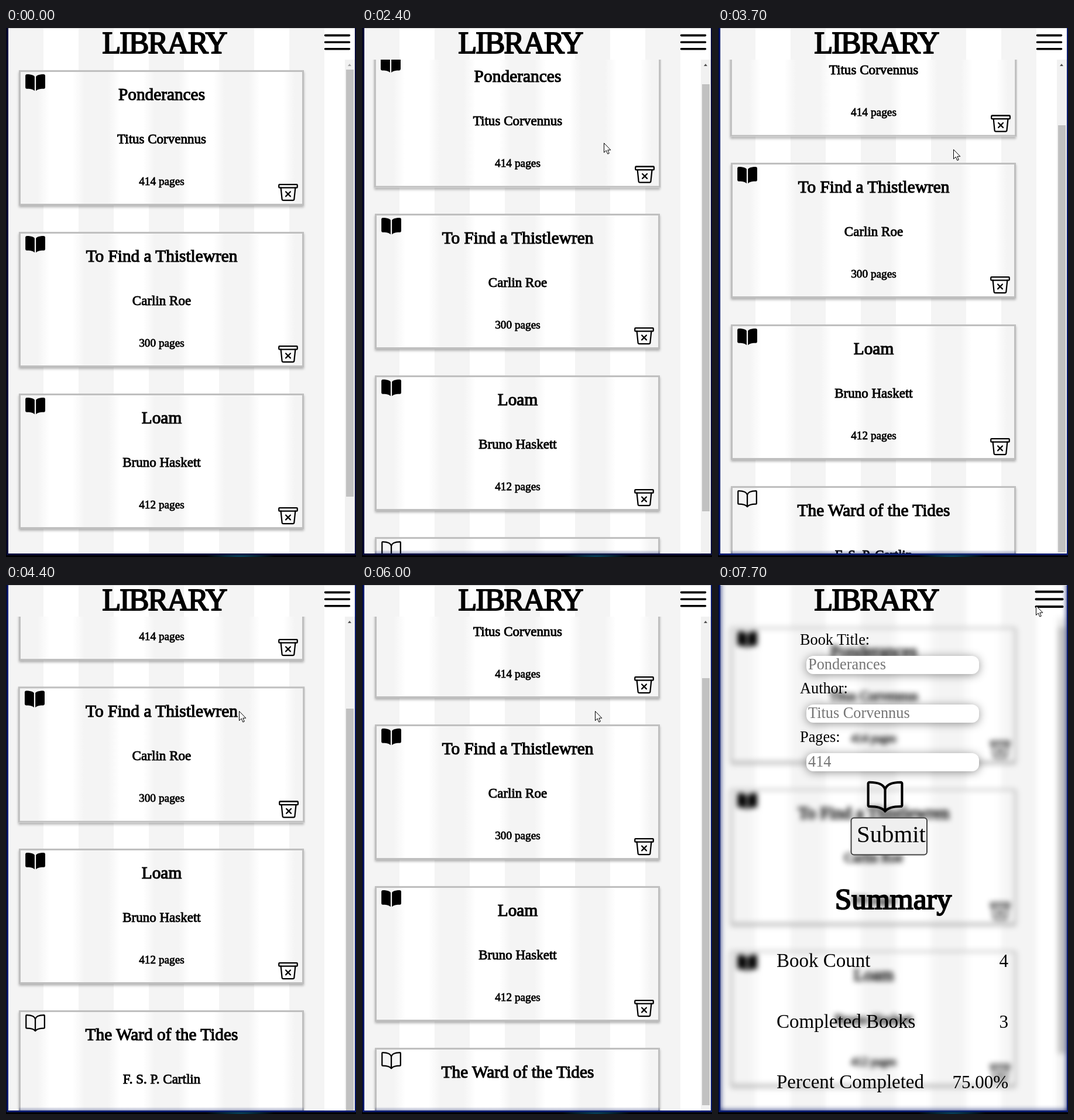
An HTML page that plays this animation: 598 by 903 pixels, repeating every 8000 ms.

```html
<!DOCTYPE html>
<html lang="en">
<head>
<meta charset="utf-8">
<title>Library</title>
<style>
  html, body { margin: 0; width: 100%; height: 100%; overflow: hidden; background: #000; }
  #stage {
    --navy: #060c3c;
    position: relative; width: 598px; height: 903px; overflow: hidden;
    background:
      radial-gradient(ellipse 60px 5px at 400px 902px, #06445f, transparent),
      linear-gradient(90deg, #000 0 1px, var(--navy) 1px) 0 0 / 100% 900px no-repeat, #000;
    font-family: "Liberation Serif", "Times New Roman", serif;
  }
  #stage.lit { --navy: #0b1c6e; }
  #view { position: absolute; left: 4px; top: 0; width: 592px; height: 897px; overflow: hidden; background: var(--navy); }
  #page {
    position: absolute; inset: -20px 0 0;
    background: repeating-linear-gradient(90deg, #f4f4f4 0 60px, #fff 60px 120px);
  }
  .open #page { filter: blur(5px); }
  #list { position: absolute; left: 0; top: 74px; width: 575px; height: 843px; overflow: hidden; }
  .card {
    position: absolute; left: 18px; width: 481px; height: 225px;
    border: 3px solid #bfbfbf;
    background: repeating-linear-gradient(90deg, #f4f4f4 0 29px, #fff 49px 89px, #f4f4f4 109px 120px);
    box-shadow: 0 3px 4px rgba(0, 0, 0, .28);
  }
  .card.hover { transform: scale(1.005); }
  .card svg { position: absolute; left: -3px; top: -3px; }
  #edge {
    position: absolute; left: 18px; bottom: 0; width: 487px; height: 6px;
    background: linear-gradient(transparent, rgba(11, 26, 102, .35));
  }
  #bar { position: absolute; left: 575px; top: 74px; width: 17px; height: 843px; background: #f1f1f1; }
  #thumb { position: absolute; left: 2px; top: 17px; width: 13px; height: 729px; background: #c1c1c1; }
  #arrow { position: absolute; left: 5px; top: 7px; border: 3.5px solid transparent; border-top: 0; border-bottom: 4px solid #505050; }
  #top { position: absolute; inset: 0; }
  .heavy { stroke: #000; stroke-width: .04em; }
  .mid { text-anchor: middle; }
  .line { fill: none; stroke: #000; stroke-width: 32; stroke-linecap: round; stroke-linejoin: round; }
  #form { display: none; }
  .open #form { display: block; }
  .field { fill: #fff; filter: drop-shadow(0 2px 8px rgba(0, 0, 0, .42)); }
  .hint { fill: #757575; }
</style>
</head>
<body>
<div id="stage">
  <div id="view">
    <div id="page">
      <div id="list"><div id="cards"></div><div id="edge"></div></div>
      <div id="bar"><div id="arrow"></div><div id="thumb"></div></div>
    </div>
  </div>
  <svg id="top" width="598" height="903">
    <defs>
      <g id="read">
        <path id="leaf" d="M202 74C166 57 116 48 48 48Q16 50 16 80V366Q18 398 48 400C119 400 190 407 233 447Q240 450 240 444V107Q240 95 202 74z"/>
        <use href="#leaf" transform="matrix(-1 0 0 1 512 0)"/>
      </g>
      <path id="unread" class="line" d="M256 160c16-63 76-95 208-96a16 16 0 0 1 16 16v288a16 16 0 0 1-16 16c-128 0-177 26-208 64-30-38-80-64-208-64a16 16 0 0 1-16-16V80a16 16 0 0 1 16-16c132 1 192 33 208 96zV448"/>
      <g id="bin" class="line">
        <rect x="32" y="64" width="448" height="80" rx="16"/>
        <path d="M432 144l-29 276a32 32 0 0 1-32 28H140a32 32 0 0 1-32-28L80 144M312 240L200 352M312 352L200 240"/>
      </g>
    </defs>
    <path d="M4 .5H596" stroke="#ccc"/>
    <text class="heavy mid" x="270.5" y="43" font-size="52" letter-spacing="-1.9">LIBRARY</text>
    <path id="menu" d="M545.5 12.6h41M545.5 24.2h41M545.5 35.8h41" stroke="#000" stroke-width="3.6" stroke-linecap="round"/>
    <g id="form">
      <g id="fields" font-size="26.3"></g>
      <use href="#unread" transform="translate(252.5 328.5) scale(.129)"/>
      <rect x="227.5" y="397.5" width="129.5" height="63" rx="5" fill="#efefef" stroke="#444" stroke-width="2"/>
      <text x="237" y="439" font-size="40.8">Submit</text>
      <text class="heavy mid" x="299.5" y="553" font-size="51.3">Summary</text>
      <g id="rows" font-size="33"></g>
    </g>
    <path id="cursor" d="M.5 .5V16.5L4.2 13L6.8 19L9.3 18L6.8 12.2H11.8z" fill="#fff" stroke="#000"/>
  </svg>
</div>
<script>
const LOOP = 8000, STEP = 100, PITCH = 276;
const $ = id => document.getElementById(id);

const books = [
  ["Ponderances", "Titus Corvennus", 414, "read"],
  ["To Find a Thistlewren", "Carlin Roe", 300, "read"],
  ["Loam", "Bruno Haskett", 412, "read"],
  ["The Ward of the Tides", "F. S. P. Cartlin", 1178, "unread"]
];

$("cards").innerHTML = books.map(([title, author, pages, icon], i) => `
  <div class="card" style="top:${18 + i * PITCH}px">
    <svg width="487" height="231">
      <use href="#${icon}" transform="translate(10 3.6) scale(.0705)"/>
      <g class="mid">
        <text class="heavy" x="244" y="51" font-size="29.3">${title}</text>
        <text class="heavy" x="244" y="125" font-size="23">${author}</text>
        <text class="heavy" x="244" y="196" font-size="19.3">${pages} pages</text>
      </g>
      <use href="#bin" transform="translate(442 190.6) scale(.0703)"/>
    </svg>
  </div>`).join("");

$("fields").innerHTML = [["Book Title:", books[0][0]], ["Author:", books[0][1]], ["Pages:", books[0][2]]]
  .map(([label, hint], i) => {
    const y = 121 + i * 83;
    return `<text x="140" y="${y - 19}">${label}</text>
      <rect class="field" x="151" y="${y}" width="295" height="31" rx="12"/>
      <text class="hint" x="154" y="${y + 23}">${hint}</text>`;
  }).join("");

$("rows").innerHTML = [["Book Count", "4"], ["Completed Books", "3"], ["Percent Completed", "75.00%"]]
  .map(([label, value], i) => {
    const y = 652 + i * 103.5;
    return `<text x="100" y="${y}">${label}</text>
      <text x="496" y="${y}" font-size="31" text-anchor="end">${value}</text>`;
  }).join("");

// Keys: [time, value, ...]
const scrollKeys = [
  [1300, 0], [1400, 3], [2000, 25], [2100, 25], [2400, 31], [2600, 31], [2700, 34], [2800, 34], [2900, 36],
  [3300, 36], [3400, 48], [3700, 118], [4200, 174], [5400, 174], [5700, 124], [5900, 124], [6000, 110], [6800, 0]
];
const cursorKeys = [
  [400, 565, 366], [800, 499, 348], [2100, 499, 348], [2400, 413, 196], [2600, 413, 196], [2700, 408, 202],
  [2800, 408, 202], [2900, 402, 207], [3700, 402, 207], [4200, 399, 213], [4400, 398, 215],
  [6800, 398, 215], [7200, 543, 35]
];

function at(keys, t) {
  const n = keys.findIndex(k => k[0] > t);
  if (n === 0) return keys[0].slice(1);
  if (n < 0) return keys[keys.length - 1].slice(1);
  const a = keys[n - 1], b = keys[n], p = (t - a[0]) / (b[0] - a[0]);
  return a.slice(1).map((v, i) => v + (b[i + 1] - v) * p);
}

const stage = $("stage"), cards = [...document.querySelectorAll(".card")];

function draw(t) {
  const [scroll] = at(scrollKeys, t);
  const [x, y] = at(cursorKeys, t);
  const [before] = at(scrollKeys, t - STEP); // hover trails the scroll
  const seen = t >= 400, onMenu = t >= 7200;

  $("cards").style.transform = `translateY(${-Math.round(scroll)}px)`;
  $("thumb").style.transform = `translateY(${Math.round(scroll * .803)}px)`;
  $("arrow").style.borderBottomColor = scroll ? "#505050" : "#a3a3a3";
  $("edge").style.opacity = scroll > 6 ? 1 : 0;
  cards.forEach((card, i) => {
    const top = 72 + i * PITCH - before;
    card.classList.toggle("hover", seen && x >= 22 && x <= 509 && y >= top && y <= top + 231);
  });

  $("cursor").style.visibility = seen ? "visible" : "hidden";
  $("cursor").setAttribute("transform", `translate(${Math.round(x)} ${Math.round(y)})`);
  $("menu").setAttribute("transform", onMenu ? "translate(566 24) scale(1.1) translate(-566 -24)" : "");
  stage.classList.toggle("lit", t >= 2900);
  stage.classList.toggle("open", t >= 7700);
}

const start = performance.now();
function tick() {
  const t = (performance.now() - start) % LOOP;
  draw(Math.floor(t / STEP) * STEP);
  requestAnimationFrame(tick);
}
tick();
</script>
</body>
</html>
```
